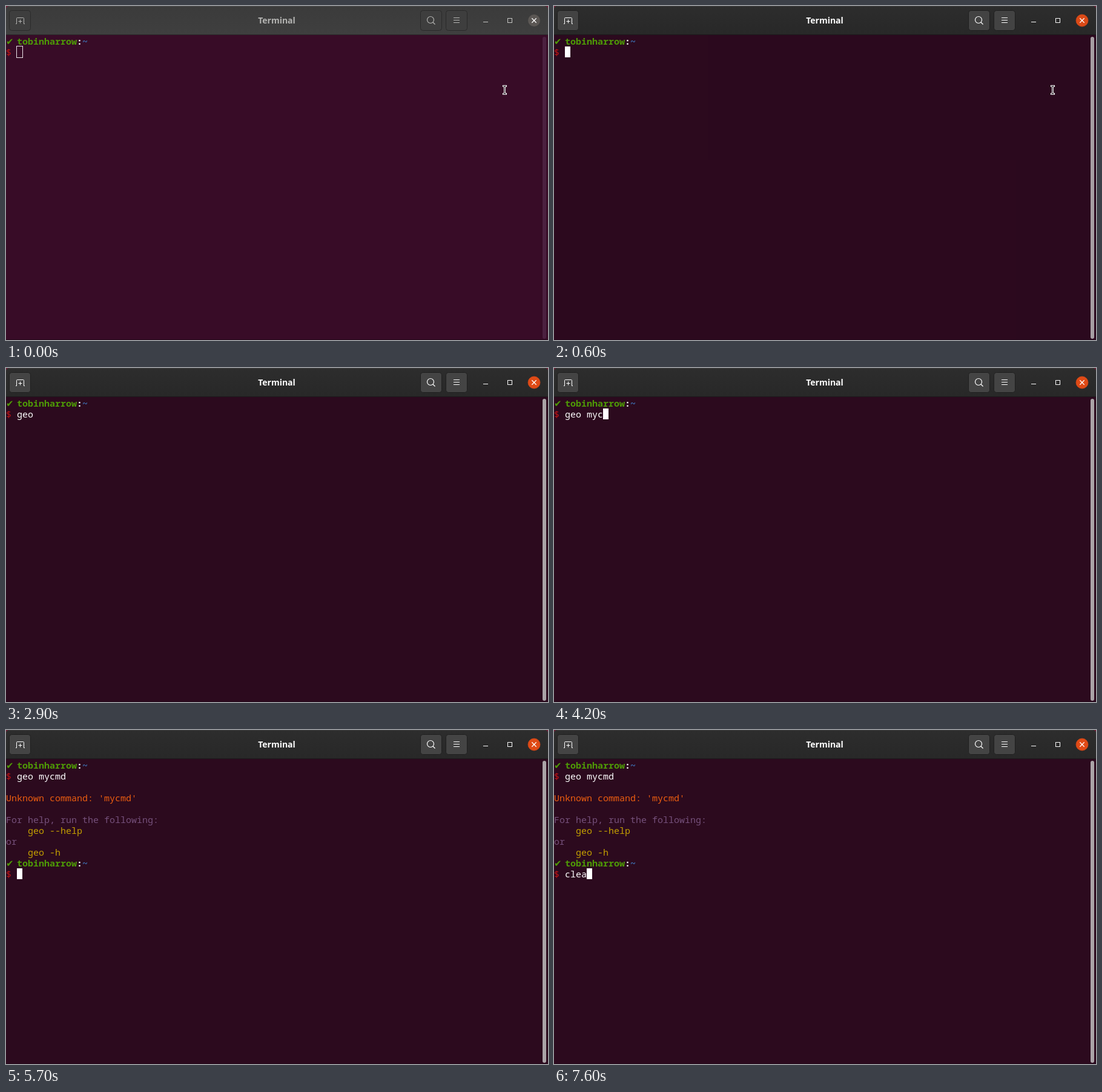
These frames come from a looping animation (895 by 553 pixels, 8000 ms). An HTML page:

```html
<!DOCTYPE html>
<html lang="en">
<head>
<meta charset="utf-8">
<title>Terminal</title>
<style>
  html, body { margin: 0; width: 100%; height: 100%; overflow: hidden; background: #701c38; }
  svg { display: block; width: 895px; height: 553px; }

  .idle {
    --bg: #380c27; --head: url(#headIdle); --edge: #2b2b2b; --shine: #4a4a4a;
    --btn: #3e3e3e; --rim: #2a2a2a; --ink: #b4b4b2; --sign: #c6c6c4;
    --close: #5b5754; --ring: none; --thumb: #4b2140;
  }
  .live {
    --bg: #2c0a1e; --head: url(#headLive); --edge: #1c1a1b; --shine: #3a3a3a;
    --btn: #444; --rim: #1f1f1f; --ink: #fff; --sign: #fff;
    --close: #df4a16; --ring: #df4a16; --thumb: #aaa3a7;
    animation: focus 8s step-end infinite;
  }
  /* the window gains focus in quick steps */
  @keyframes focus {
    0% { opacity: 0; }
    6.25% { opacity: .5; }
    7.5% { opacity: .97; }
    8.75%, 100% { opacity: 1; }
  }
  .pointer { animation: hide 8s step-end infinite; }
  @keyframes hide {
    0% { visibility: visible; }
    22.5%, 100% { visibility: hidden; }
  }

  .line { fill: none; stroke: var(--ink); }
  .sign { fill: none; stroke: var(--sign); }
  .btn { fill: var(--btn); stroke: var(--rim); }
  .title { font: bold 14px "Open Sans", "Noto Sans", sans-serif; fill: var(--ink); text-anchor: middle; }

  .term text { font: 15px "Noto Sans Mono", "DejaVu Sans Mono", monospace; white-space: pre; fill: #fff; }
  .term .bold { font-weight: bold; }
  .term .tick { font-family: "DejaVu Sans", sans-serif; }
  .term .user, .term .tick { fill: #4e9a06; }
  .term .path { fill: #3f74b8; }
  .term .sigil { fill: #c01414; }
  .term .error { fill: #ec5d10; }
  .term .note { fill: #75507b; }
  .term .hint { fill: #c4a000; }
</style>
</head>
<body>
<svg viewBox="0 0 895 553">
  <defs>
    <linearGradient id="headIdle" x2="0" y2="1">
      <stop stop-color="#3b3b3b"/><stop offset="1" stop-color="#3f3f3f"/>
    </linearGradient>
    <linearGradient id="headLive" x2="0" y2="1">
      <stop stop-color="#2d2d2d"/><stop offset="1" stop-color="#282828"/>
    </linearGradient>

    <g id="window">
      <rect y="46" width="895" height="507" fill="var(--bg)"/>
      <path d="M0 47V6Q0 0 6 0H889Q895 0 895 6V47Z" fill="var(--head)"/>
      <path d="M5 .5H890" stroke="var(--shine)"/>
      <path d="M0 47.5H895" stroke="var(--edge)"/>
      <text class="title" x="447" y="29">Terminal</text>

      <rect class="btn" x="5.5" y="7.5" width="35" height="33" rx="4"/>
      <rect class="btn" x="684.5" y="7.5" width="35" height="33" rx="4"/>
      <rect class="btn" x="726.5" y="7.5" width="35" height="33" rx="4"/>
      <path class="line" d="M16 29.5H17.5V20.5Q17.5 19.5 18.5 19.5H28.5Q29.5 19.5 29.5 20.5V29.5H31M20.5 25.5H26.5M23.5 22.5V28.5"/>
      <circle class="line" cx="701" cy="23" r="5.5" stroke-width="1.2"/>
      <path class="line" d="M705 27L708.5 30.5" stroke-width="1.3"/>
      <path class="line" d="M739 19.5H749M739 23.5H749M739 27.5H749"/>

      <path class="sign" d="M788 26.5H796"/>
      <rect class="sign" x="828.5" y="20.5" width="7" height="7"/>
      <circle cx="872" cy="24" r="10" fill="var(--close)" stroke="var(--ring)" stroke-width=".7"/>
      <path d="M868.3 20.3L875.7 27.7M875.7 20.3L868.3 27.7" stroke="#fff" stroke-width="1.3"/>

      <rect x="886" y="51" width="6" height="500" rx="3" fill="var(--thumb)"/>
    </g>
  </defs>

  <use href="#window" class="idle"/>
  <use href="#window" class="live"/>
  <path d="M0 552.5H895" stroke="#24081a"/>

  <g class="term">
    <g id="screen"></g>
    <g id="reply"></g>
    <rect id="caret"/>
  </g>

  <g class="pointer" fill="none">
    <path d="M820 132.5H827M820 145.5H827M823.5 132V146" stroke="#fff" stroke-width="3"/>
    <path d="M821 132.5H826M821 145.5H826M823.5 132V146" stroke="#1a1018"/>
  </g>
</svg>
<script>
  const LOOP = 8000, CELL = 9, ROW = 18, TOP = 49;
  const $ = id => document.getElementById(id);
  const screen = $("screen"), reply = $("reply"), caret = $("caret");

  function put(parent, col, row, style, words) {
    const el = document.createElementNS("http://www.w3.org/2000/svg", "text");
    el.setAttribute("x", col * CELL);
    el.setAttribute("y", TOP + row * ROW + 15);
    el.setAttribute("class", style);
    el.textContent = words;
    parent.append(el);
    return el;
  }

  function prompt(parent, row) {
    put(parent, 0, row, "tick", "✔");
    put(parent, 2, row, "bold user", "tobinharrow");
    put(parent, 13, row, "bold", ":");
    put(parent, 14, row, "bold path", "~");
    put(parent, 0, row + 1, "sigil", "$");
    return put(parent, 2, row + 1, "", "");
  }

  const first = prompt(screen, 0);
  put(reply, 0, 3, "error", "Unknown command: 'mycmd'");
  put(reply, 0, 5, "note", "For help, run the following:");
  put(reply, 4, 6, "hint", "geo --help");
  put(reply, 0, 7, "note", "or");
  put(reply, 4, 8, "hint", "geo -h");
  const second = prompt(reply, 9);

  // time of each key press
  const command = { words: "geo mycmd", keys: [1800, 1900, 2000, 2300, 3600, 3800, 4200, 4400, 5000] };
  const clear = { words: "clea", keys: [7200, 7300, 7400, 7600] };
  const ENTER = 5700, FOCUS = 500;
  const blinks = [[1100, 1700], [2900, 3600], [6200, 6900]];

  const typed = ({ words, keys }, t) => words.slice(0, keys.filter(k => k <= t).length);

  function setCaret(x, y, w, h, fill, stroke) {
    Object.entries({ x, y, width: w, height: h, fill, stroke })
      .forEach(([name, value]) => caret.setAttribute(name, value));
  }

  function draw(t) {
    const done = t >= ENTER;
    const a = typed(command, t), b = typed(clear, t);
    first.textContent = a;
    second.textContent = b;
    reply.style.display = done ? "" : "none";

    const x = (2 + (done ? b : a).length) * CELL;
    const y = TOP + (done ? 10 : 1) * ROW;
    if (t < FOCUS) setCaret(x - .5, y - .5, CELL + 1, ROW + 1, "none", "#ece5ea");
    else setCaret(x, y, CELL, ROW, "#fff", "none");
    const off = blinks.some(([from, to]) => t >= from && t < to);
    caret.style.visibility = off ? "hidden" : "visible";
  }

  const start = performance.now();
  function tick() {
    draw((performance.now() - start) % LOOP);
    requestAnimationFrame(tick);
  }
  tick();
</script>
</body>
</html>
```
